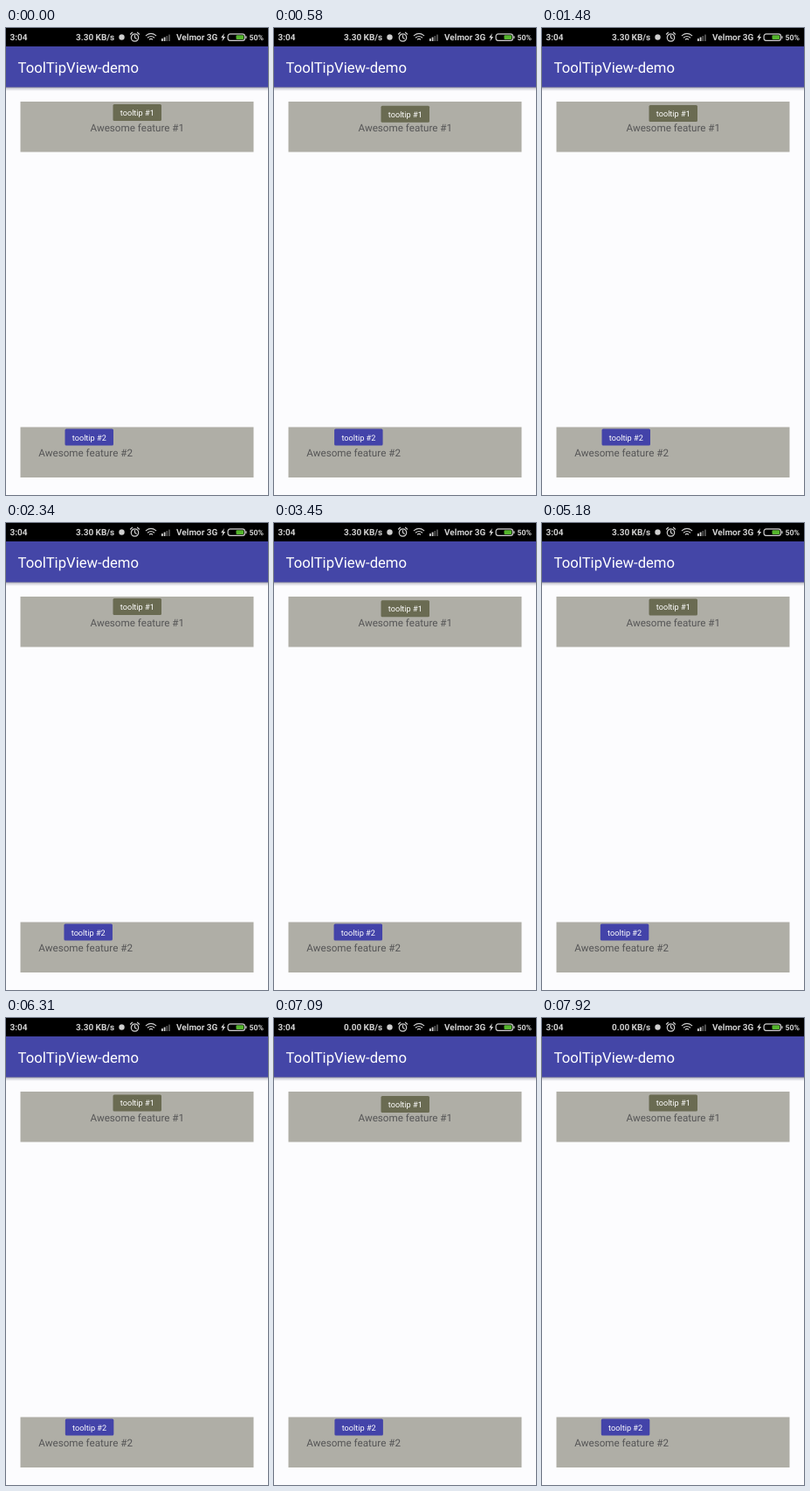
An HTML page that plays this animation: 300x533 px, repeating every 8000 ms.

```html
<!DOCTYPE html>
<html lang="en">
<head>
<meta charset="utf-8">
<title>ToolTipView-demo</title>
<style>
  html, body { margin: 0; height: 100%; overflow: hidden; background: #fcfcfe; }
  svg { display: block; width: 100vw; height: 100vh; }
  text { font-family: Roboto, sans-serif; text-rendering: geometricPrecision; }
  .status { font-size: 10px; font-weight: 700; fill: #cfcfcf; }
  .title { font-size: 16.67px; fill: #fff; }
  .feature { font-size: 11.67px; fill: #555556; }
  .tip { font-size: 9.17px; fill: #fff; text-anchor: middle; }
  .panel { fill: #afaea6; }
  .line { fill: none; stroke: #cfcfcf; stroke-width: 1.2; stroke-linecap: round; }
</style>
</head>
<body>
<svg viewBox="0 0 300 533" preserveAspectRatio="none">
  <defs>
    <linearGradient id="shadow" x2="0" y2="1">
      <stop stop-color="#85858f"/>
      <stop offset=".4" stop-color="#d2d2da"/>
      <stop offset="1" stop-color="#fcfcfe"/>
    </linearGradient>
  </defs>
  <rect width="300" height="533" fill="#fcfcfe"/>

  <!-- Status bar -->
  <rect width="300" height="21" fill="#000"/>
  <g class="status">
    <text x="4.5" y="14.3">3:04</text>
    <text id="speed" x="80" y="14.3">3.30 KB/s</text>
    <text x="195" y="14.3">Velmor 3G</text>
    <text x="278.5" y="14" font-size="8.8">50%</text>
  </g>
  <circle cx="132.5" cy="10.5" r="3.2" fill="#cfcfcf"/>
  <g class="line">
    <circle cx="147.5" cy="11" r="4.2"/>
    <path d="M147.5 8.5V11l1.8 1.2M142.5 7l2-1.8M152.5 7l-2-1.8"/>
    <path d="M160.3 8.6q5.7-4.6 11.4 0M162.3 10.9q3.7-2.8 7.4 0M164.3 13q1.7-1.2 3.4 0"/>
    <rect x="254.1" y="6.8" width="19.4" height="7.6" rx="2.6"/>
    <path d="M275 9.7v1.8"/>
  </g>
  <path d="M178 12h1.8v3H178zM180.7 10.5h1.8V15h-1.8z" fill="#cfcfcf"/>
  <path d="M183.4 9h1.8v6h-1.8zM186.1 7.5h1.8V15h-1.8z" fill="#555"/>
  <path d="M249.8 6l-3.6 5h2l-.8 4.3 3.8-5.4h-2.1z" fill="#cfcfcf"/>
  <rect x="263.5" y="8.3" width="8.6" height="4.6" rx="1" fill="#54b52c"/>

  <!-- Toolbar -->
  <rect y="67" width="300" height="5" fill="url(#shadow)"/>
  <rect y="21" width="300" height="46.5" fill="#4446a7"/>
  <text class="title" x="13.5" y="51">ToolTipView-demo</text>

  <!-- Panels -->
  <rect class="panel" x="16.5" y="84" width="267" height="57.5"/>
  <rect class="panel" x="16.5" y="455.5" width="267" height="57.5"/>
  <text class="feature" x="150.3" y="117.6" text-anchor="middle">Awesome feature #1</text>
  <text class="feature" x="37.3" y="488.7">Awesome feature #2</text>

  <!-- Tooltips -->
  <g id="tipTop">
    <rect width="55.5" height="19" rx="1.5" fill="#6a6b52"/>
    <text class="tip" x="27.8" y="13">tooltip #1</text>
  </g>
  <g id="tipBottom">
    <rect width="55.5" height="19" rx="1.5" fill="#4343a9"/>
    <text class="tip" x="27.8" y="13">tooltip #2</text>
  </g>
</svg>
<script>
  const LOOP = 8000, SWING = 3100, PEAK = 7110, SPEED_DROP = 6480;
  const [tipTop, tipBottom, speed] =
    ["tipTop", "tipBottom", "speed"].map(id => document.getElementById(id));
  const place = (el, x, y) => el.setAttribute("transform", `translate(${x} ${y})`);

  function draw() {
    const t = performance.now() % LOOP;
    const sway = 1.5 * Math.cos(2 * Math.PI * (t - PEAK) / SWING);
    place(tipTop, 122.5, 87.5 + sway);
    place(tipBottom, 67.9 + sway, 457.5);
    speed.textContent = t < SPEED_DROP ? "3.30 KB/s" : "0.00 KB/s";
    requestAnimationFrame(draw);
  }
  draw();
</script>
</body>
</html>
```
